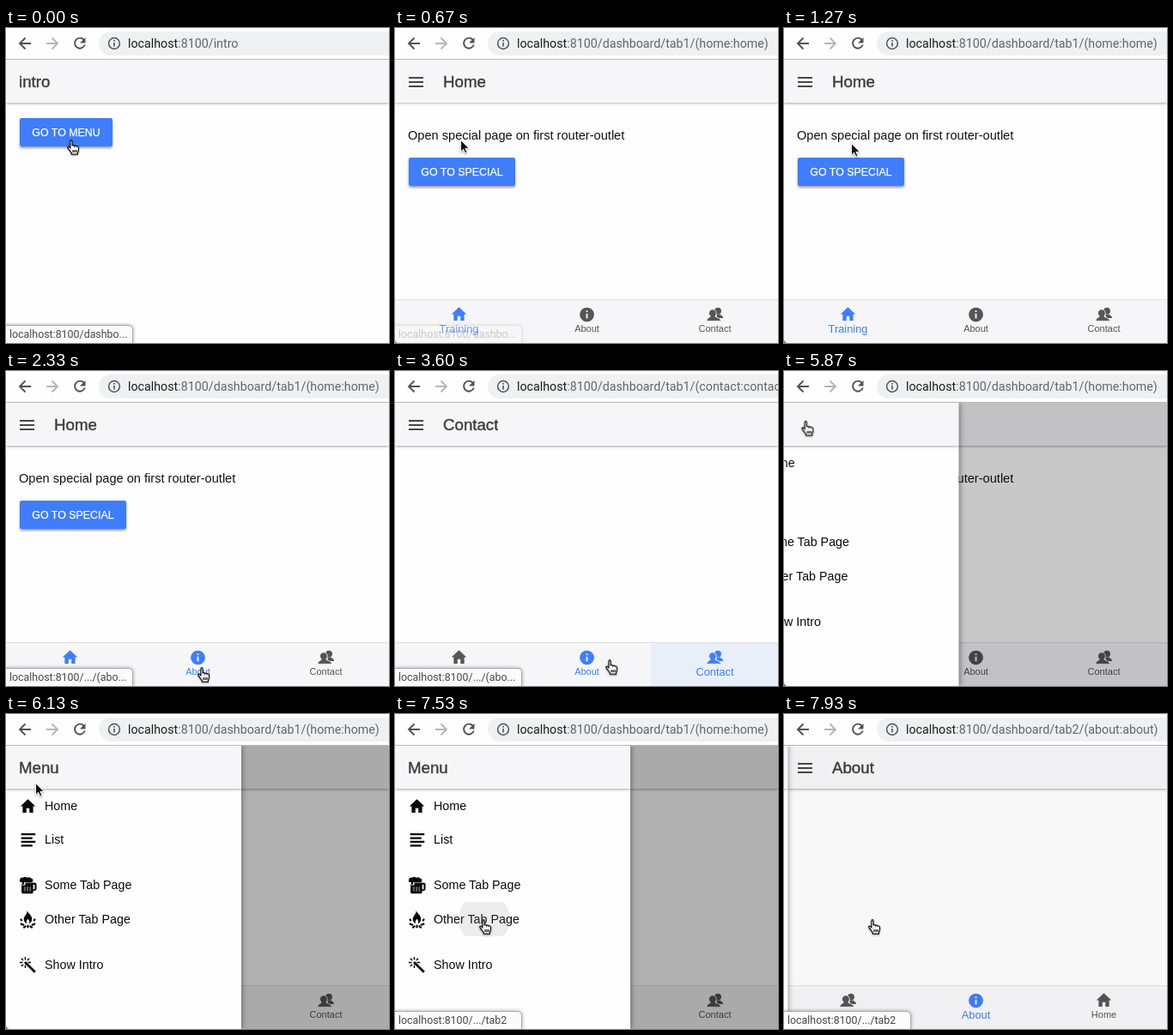
Animation of 446 by 367 pixels, one loop 8000 ms. Source, as an HTML page:

```html
<!DOCTYPE html>
<html lang="en">
<head>
<meta charset="utf-8">
<title>Router demo</title>
<style>
/* Every animation lasts 8 s, so 1% is 80 ms. */
html, body { margin: 0; width: 100%; height: 100%; overflow: hidden; background: #fefefe; }
.stage, .stage * { box-sizing: border-box; }
.stage {
  --blue: #3f7efa; --grey: #555557; --bar: #f6f6f8;
  --path: 0; --title: 0; --hint: 0;
  position: relative; width: 446px; height: 367px; overflow: hidden;
  background: #fefefe; color: #111;
  font: 14.6px "Liberation Sans", Arial, sans-serif; white-space: nowrap;
  animation: nav 8s step-end infinite, hint 8s step-end infinite;
}
.stage svg { display: block; overflow: visible; fill: currentColor; }
.layer { position: absolute; inset: 37px 0 0; isolation: isolate; background: #fefefe; }
.abs { position: absolute; }

/* Browser toolbar */
.toolbar { position: absolute; z-index: 5; inset: 0 0 auto; height: 37px; background: #fefefe; border-bottom: 1px solid #b9b9bb; }
.toolbar svg { position: absolute; left: 0; top: 0; fill: none; stroke: #505357; stroke-width: 1.9; }
.field { position: absolute; left: 108px; top: 4px; width: 360px; height: 28px; border-radius: 14px; background: #eff0f2; }
.url { position: absolute; left: 142px; top: 4px; display: flex; font: 14.25px/28px Roboto, sans-serif; color: #1d1e20; }
.url .strip, .port { color: #636669; }

/* A window that shows one line of a stack */
.strip { height: var(--h); line-height: var(--h); overflow: hidden; }
.strip div { transform: translateY(calc(var(--n) * var(--h) * -1)); }
.strip span { display: block; }

/* Page parts */
.header { position: absolute; z-index: 1; inset: 0 0 auto; height: 50px; background: var(--bar); box-shadow: 0 1px 3px rgba(0,0,0,.35); }
.name { position: absolute; left: 15px; top: 1px; font-size: 18.7px; line-height: 50px; color: #3c3c3e; -webkit-text-stroke: .4px; }
.name.strip { left: 56px; }
.burger { position: absolute; left: 16px; top: 20px; width: 17px; height: 12px; border: solid #48484a; border-width: 2px 0; }
.burger::after { content: ""; position: absolute; inset: 3px 0; background: #48484a; }
.button { position: absolute; left: 16px; height: 33px; border-radius: 2px; overflow: hidden; background: #3f7dfb; color: #fff;
  font-size: 12.4px; line-height: 34px; text-align: center; -webkit-text-stroke: .25px; }
.shade { position: absolute; left: 16px; height: 33px; border-radius: 2px; box-shadow: 0 2px 3px rgba(0,0,0,.38); }
.dash { animation: enter 8s infinite; }
.home { animation: home 8s step-end infinite; }

/* Tabs */
.tabs { position: absolute; inset: auto 0 0; height: 51px; display: flex; background: var(--bar); border-top: 1px solid #dfdfe1; }
.tab { flex: 0 0 149px; height: 50px; position: relative; color: var(--grey); font-size: 11px; text-align: center; }
.tab svg { position: absolute; left: 64px; top: 6px; width: 21px; height: 21px; }
.tab span { position: absolute; inset: 24px 0 auto; line-height: 19px; }
.tab.on { color: var(--blue); font-size: 12.8px; }
.training { animation: training 8s step-end infinite; }
.about { animation: about 8s step-end infinite; }
.contact { animation: contact 8s step-end infinite; }
.second { animation: second 8s step-end infinite; }

/* Side menu */
.backdrop { position: absolute; inset: 37px 0 0; background: #000; opacity: 0; animation: dim 8s infinite; }
.menu { position: absolute; left: 0; top: 37px; width: 274px; height: 330px; background: #fefefe; overflow: hidden;
  box-shadow: 1px 0 6px rgba(0,0,0,.4); animation: slide 8s infinite; }
.item { position: absolute; left: 0; width: 274px; height: 40px; padding-left: 45px; font-size: 14.3px; line-height: 40px; overflow: hidden; color: #0a0a0a; }
.item svg { position: absolute; left: 15px; top: 10px; width: 21px; height: 21px; }

.ripple { position: absolute; width: 60px; height: 60px; border-radius: 50%; opacity: 0; }
.ripple.light { left: 30px; top: -4px; background: #fff; animation: tap 8s infinite; }
.ripple.dark { left: 74px; top: -10px; background: #888; animation: pick 8s infinite; }

/* Link hint, window corner, pointer */
.hint { position: absolute; left: -1px; top: 346px; width: 149px; height: 22px; padding-left: 4px; display: flex;
  border: 1px solid #a9a9ab; border-top-right-radius: 5px; background: #fbfbfb; box-shadow: 0 0 4px rgba(0,0,0,.35);
  font: 12.4px/20px Roboto, sans-serif; color: #454649; animation: show 8s infinite; }
.corner { position: absolute; left: 0; bottom: 0; width: 4px; height: 4px; background: radial-gradient(circle at 100% 0, transparent 3.5px, #77797c 4px); }
.pointer { position: absolute; z-index: 9; left: 0; top: 0; --hand: 1; animation: move 8s ease-in-out infinite, kind 8s step-end infinite; }
.pointer svg { position: absolute; filter: drop-shadow(0 1px 1px rgba(0,0,0,.35)); }
.hand { left: -5px; top: 0; opacity: var(--hand); }
.arrow { left: 0; top: 0; opacity: calc(1 - var(--hand)); }

@keyframes nav {
  0% { --path: 0; --title: 0; }
  5% { --path: 1; --title: 0; }
  30.5% { --path: 2; --title: 1; }
  40.5% { --path: 3; --title: 2; }
  52.5% { --path: 1; --title: 0; }
  96% { --path: 4; --title: 1; }
}
@keyframes hint {
  0% { --hint: 0; }
  20% { --hint: 1; }
  36% { --hint: 2; }
  44% { --hint: 1; }
  47.5% { --hint: 3; }
  57% { --hint: 4; }
  80% { --hint: 5; }
  88.5% { --hint: 6; }
}
@keyframes show {
  0%, 7.5% { opacity: 1; }
  9.5%, 22.6% { opacity: 0; }
  23.6%, 64% { opacity: 1; }
  65%, 84.5% { opacity: 0; }
  85.5%, 100% { opacity: 1; }
}
@keyframes enter {
  0%, 5% { opacity: 0; transform: translateY(40px); animation-timing-function: cubic-bezier(.36,.66,.04,1); }
  8.5%, 100% { opacity: 1; transform: none; }
}
@keyframes home {
  0% { visibility: visible; }
  30.5% { visibility: hidden; }
  52.5% { visibility: visible; }
  96% { visibility: hidden; }
}
@keyframes training {
  0% { color: var(--blue); font-size: 12.8px; }
  30.5% { color: var(--grey); font-size: 11px; }
  47.5% { color: var(--blue); }
  52.5% { color: var(--blue); font-size: 12.8px; }
}
@keyframes about {
  0% { color: var(--grey); font-size: 11px; }
  22% { color: var(--blue); }
  30.5% { font-size: 12.8px; }
  40.5% { color: var(--grey); font-size: 11px; }
  44% { color: var(--blue); }
  47% { color: var(--grey); }
}
@keyframes contact {
  0% { color: var(--grey); font-size: 11px; background: transparent; }
  36% { color: var(--blue); }
  40.5% { font-size: 12.8px; background: #e9eff9; }
  52.5% { color: var(--grey); font-size: 11px; background: transparent; }
}
@keyframes second { 0% { visibility: hidden; } 96% { visibility: visible; } }
@keyframes slide {
  0%, 72% { transform: translateX(-284px); animation-timing-function: cubic-bezier(0,0,.2,1); }
  75.5%, 95.875% { transform: none; animation-timing-function: cubic-bezier(.4,0,.6,1); }
  99.73%, 100% { transform: translateX(-284px); }
}
@keyframes dim {
  0%, 72% { opacity: 0; }
  75.5%, 95.875% { opacity: .31; animation-timing-function: cubic-bezier(.4,0,.6,1); }
  99.73%, 100% { opacity: .01; }
}
@keyframes tap {
  0%, .9% { opacity: .3; transform: scale(0); }
  5% { opacity: .15; transform: scale(1.8); }
  7%, 100% { opacity: 0; transform: scale(1.8); }
}
@keyframes pick {
  0%, 93.2% { opacity: .2; transform: scale(0); }
  94.2% { opacity: .15; transform: scale(1); }
  95.6%, 100% { opacity: 0; transform: scale(1.6); }
}
@keyframes move {
  0%, 9% { transform: translate(76px, 130px); }
  10.5%, 16% { transform: translate(78px, 134px); }
  22% { transform: translate(232px, 328px); }
  25%, 33.4% { transform: translate(228px, 345px); }
  37.5%, 42% { transform: translate(375px, 343px); animation-timing-function: ease-in; }
  45% { transform: translate(251px, 336px); animation-timing-function: ease-out; }
  49%, 54% { transform: translate(74px, 338px); }
  58.5% { transform: translate(70px, 168px); }
  62%, 63.5% { transform: translate(43px, 55px); }
  65.9%, 73% { transform: translate(25px, 57px); }
  76%, 82% { transform: translate(34px, 80px); }
  91.6%, 100% { transform: translate(103px, 239px); }
}
@keyframes kind {
  0% { --hand: 1; }
  5% { --hand: 0; }
  22% { --hand: 1; }
  55% { --hand: 0; }
  57.5% { --hand: 1; }
  59.5% { --hand: 0; }
  65.5% { --hand: 1; }
  74% { --hand: 0; }
  84% { --hand: 1; }
}
</style>
</head>
<body>
<svg width="0" height="0" style="position:absolute">
  <symbol id="house" viewBox="0 0 24 24"><path d="M10 20.500v-6h4v6h5V12h3L12 2.500 2 12h3v8.500z"/></symbol>
  <symbol id="info" viewBox="0 0 24 24"><path fill-rule="evenodd" d="M12 3a9.500 9.500 0 1 0 .01 0zM10.900 7h2.200v2.200h-2.200zm0 4h2.200v6.400h-2.200z"/></symbol>
  <symbol id="people" viewBox="0 0 24 24">
    <circle cx="16" cy="7.500" r="4.500"/>
    <path d="M14 12h5c.5 1.500 3.500 1.500 4 5h-8z"/>
    <g stroke="#f6f6f8">
      <path d="M6 14.500h6.500c.5 2.200 7 1.800 7.500 6.500H1c.3-4.700 4.700-4.300 5-6.500z"/>
      <circle cx="9" cy="10.500" r="5"/>
    </g>
    <path d="M6.500 13h5.500v3H6.500z"/>
  </symbol>
  <symbol id="lines" viewBox="0 0 24 24"><path d="M3 3.500h19v2.600H3zm0 5h15v2.600H3zm0 5h19v2.600H3zm0 5h15v2.600H3z"/></symbol>
  <symbol id="mug" viewBox="0 0 24 24">
    <path d="M1 6C1 3 3 1 5.500 2 7 .2 9.500.4 11 2c2-1.300 4-.7 5 .8 2.200-.2 3.500 2 2.500 4.200l-1.500 1H7v3H4.500V8C2.500 8.500 1 7.500 1 6z"/>
    <path fill-rule="evenodd" d="M3.500 9v12c0 1.300.8 2 2 2h11.500c1.200 0 2-.7 2-2v-1.500h1.500c2 0 3-1 3-2.800v-5.500c0-1.700-1-2.700-3-2.700H8.500V12h-4zm15.500 2h1.200c.6 0 .9.300.9.800v4.700c0 .5-.3.800-.9.800H19z"/>
    <path d="M8 14v6m3.500-6v6m3.500-6v6" stroke="#fff" stroke-width=".8"/>
  </symbol>
  <symbol id="fire" viewBox="0 0 24 24">
    <path d="M11 0c1 3.500 6.500 6 6.500 11.500 0 3-1.800 5.200-4 6 1-2.700.3-4.700-1.500-6.500-1.800 2-2.500 3.800-1.500 6.500-2.300-.8-4-3-4-6C6.500 7 11.500 5 11 0z"/>
    <path d="M2.500 11l1.500 3m17.500-3L20 14M2 17.500l5 2m15-2l-5 2M6 23l3.500-2.500M18 23l-3.500-2.500M12 19v4" fill="none" stroke="currentColor" stroke-width="2.500"/>
  </symbol>
  <symbol id="wand" viewBox="0 0 24 24">
    <path d="M8 8l13.500 13.500" fill="none" stroke="currentColor" stroke-width="3.200"/>
    <path d="M8.500 1v4m0 7v4M1 8.500h4m7 0h4M3.200 3.200l2.600 2.600m8-2.600l-2.600 2.600m-8 8l2.600-2.600" fill="none" stroke="currentColor" stroke-width="1.600"/>
  </symbol>
</svg>

<div class="stage">
  <div class="layer">
    <div class="header"><div class="name">intro</div></div>
    <div class="shade" style="top:68px;width:108px"></div>
    <div class="button" style="top:68px;width:108px"><i class="ripple light"></i>GO TO MENU</div>
  </div>

  <div class="layer dash">
    <div class="header">
      <div class="burger"></div>
      <div class="name strip" style="--h:50px;--n:var(--title)"><div><span>Home</span><span>About</span><span>Contact</span></div></div>
    </div>
    <div class="home">
      <div class="abs" style="left:15px;top:79px;line-height:18px">Open special page on first router-outlet</div>
      <div class="shade" style="top:114px;width:124px"></div>
      <div class="button" style="top:114px;width:124px">GO TO SPECIAL</div>
    </div>
    <div class="tabs">
      <div class="tab training"><svg><use href="#house"/></svg><span>Training</span></div>
      <div class="tab about"><svg><use href="#info"/></svg><span>About</span></div>
      <div class="tab contact"><svg><use href="#people"/></svg><span>Contact</span></div>
    </div>
    <div class="tabs second">
      <div class="tab"><svg><use href="#people"/></svg><span>Contact</span></div>
      <div class="tab on"><svg><use href="#info"/></svg><span>About</span></div>
      <div class="tab"><svg><use href="#house"/></svg><span>Home</span></div>
    </div>
  </div>

  <div class="backdrop"></div>
  <div class="menu">
    <div class="header"><div class="name">Menu</div></div>
    <div class="item" style="top:50px"><svg><use href="#house"/></svg>Home</div>
    <div class="item" style="top:89px"><svg><use href="#lines"/></svg>List</div>
    <div class="item" style="top:142px"><svg><use href="#mug"/></svg>Some Tab Page</div>
    <div class="item" style="top:182px"><i class="ripple dark"></i><svg><use href="#fire"/></svg>Other Tab Page</div>
    <div class="item" style="top:235px"><svg><use href="#wand"/></svg>Show Intro</div>
  </div>

  <div class="toolbar">
    <div class="field"></div>
    <svg width="140" height="36">
      <path d="M29 18H16.500M22.500 11.500L16 18l6.500 6.500"/>
      <path d="M47 18h12.500M53.500 11.500L60 18l-6.500 6.500" stroke="#b4b6b9"/>
      <path d="M90.700 13.800A6 6 0 1 0 91.800 19.500"/>
      <path d="M92.500 11v6.500H86z" fill="#505357" stroke="none"/>
      <circle cx="126" cy="18" r="6.400" stroke-width="1.500"/>
      <path d="M126 17v4.500M126 14v1.700" stroke-width="1.600"/>
    </svg>
    <div class="url">localhost<span class="port">:8100</span>
      <div class="strip" style="--h:28px;--n:var(--path)"><div>
        <span>/intro</span>
        <span>/dashboard/tab1/(home:home)</span>
        <span>/dashboard/tab1/(about:about)</span>
        <span>/dashboard/tab1/(contact:contact)</span>
        <span>/dashboard/tab2/(about:about)</span>
      </div></div>
    </div>
  </div>

  <div class="corner"></div>
  <div class="hint">localhost:8100/
    <div class="strip" style="--h:20px;--n:var(--hint)"><div>
      <span>dashbo...</span>
      <span>.../(abo...</span>
      <span>.../(con...</span>
      <span>.../(hom...</span>
      <span>.../special</span>
      <span>.../tab1</span>
      <span>.../tab2</span>
    </div></div>
  </div>

  <div class="pointer">
    <svg class="hand" width="16" height="18"><path fill="#fff" stroke="#111" stroke-width="1.200" d="M4.500.7c1 0 1.600.7 1.600 1.600v5c.2-.9 2.400-.9 2.600.3.3-.8 2.400-.6 2.500.6.6-.6 2.200-.3 2.300 1v3.200c0 1-.9 2.200-1.100 3.200v1.600h-7v-1.400c-1-1.500-3.300-4-4.600-6.400-.4-1.400 1.100-1.800 2.200-.6l.9 1V2.300c0-.9.7-1.600 1.600-1.600zM7 12v3m2-3v3m2-3v3"/></svg>
    <svg class="arrow" width="12" height="18"><path fill="#111" stroke="#fff" d="M.5.5v13.700l3.100-3 2.200 5 2.300-1-2.200-4.800h4.400z"/></svg>
  </div>
</div>
</body>
</html>
```
